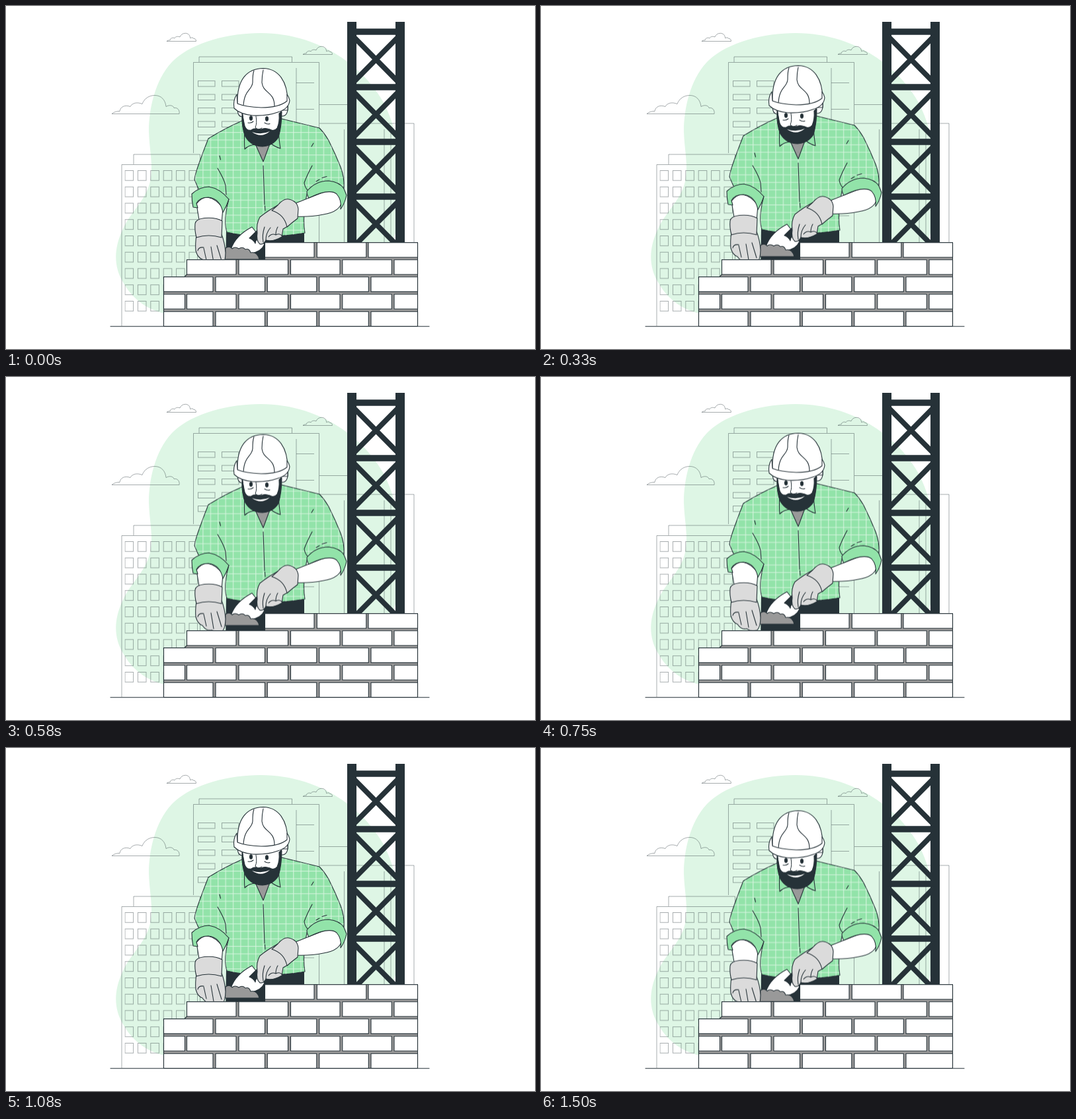
Animation of 800 by 520 pixels, one loop 1.54 s. Source, as an HTML page without scripts:

```html
<!DOCTYPE html>
<html lang="en">
<head>
<meta charset="utf-8">
<title>Bricklayer</title>
<style>
  html, body { margin: 0; width: 100%; height: 100%; overflow: hidden; background: #fff; }
  svg { display: block; width: 100%; height: 100%; }
  .city, .cloud { fill: none; stroke: #263238; stroke-opacity: .4; stroke-width: 1; }
  .cloud { vector-effect: non-scaling-stroke; }
  .tower { fill: none; stroke: #263238; }
  .ink { stroke: #263238; stroke-width: 1.1; stroke-linejoin: round; stroke-linecap: round; }
  .line { fill: none; }
  .white { fill: #fff; }
  .shirt { fill: #92e3a9; }
  .glove { fill: #dbdbdb; }
  .mortar { fill: #999; }
  .dark { fill: #263238; }
  .man { animation: bob 1540ms linear infinite; }
  @keyframes bob {
    0% { transform: translateY(0); }
    48.4% { transform: translateY(-9.5px); }
    97.4% { transform: translateY(.5px); }
    100% { transform: translateY(0); }
  }
</style>
</head>
<body>
<svg viewBox="0 0 800 520">
  <defs>
    <pattern id="panes" x="179.5" y="249" width="19.4" height="24.75" patternUnits="userSpaceOnUse">
      <rect class="city" x=".5" y=".5" width="12.6" height="15"/>
    </pattern>
    <pattern id="plaid" x="349.500" y="163.500" width="11.4" height="11.4" patternUnits="userSpaceOnUse">
      <path d="M5.5 0V11.4M0 5.5H11.4" stroke="#fff" stroke-opacity=".65" fill="none"/>
    </pattern>
    <path id="cloud" class="cloud" d="M0 0H102C103-6 99-10 94-9C93-13 87-14 82-11C81-21 75-28 65-28C56-28 49-23 46-15C39-18 31-17 28-11C20-14 13-11 12-4C8-4 3-3 0 0Z"/>
    <g id="slots">
      <rect x="290.5" width="25.5" height="8.5"/>
      <rect x="326.5" width="25.5" height="8.5"/>
    </g>
    <path id="brace" stroke-width="8" d="M526 3L593 71M593 3L526 71"/>
    <rect id="brick" class="white ink" width="74.5" height="22.3"/>
    <g id="oddRow">
      <use href="#brick" x="238.5"/><use href="#brick" x="317"/><use href="#brick" x="395.3"/><use href="#brick" x="473.8"/>
      <rect class="white ink" x="552" width="70.5" height="22.3"/>
    </g>
    <g id="evenRow">
      <use href="#brick" x="273.5"/><use href="#brick" x="352"/><use href="#brick" x="430.5"/><use href="#brick" x="508.8"/>
      <rect class="white ink" x="587" width="35.5" height="22.3"/>
    </g>
    <path id="torso" d="M357 174Q330 186 306 201Q297 224 290 244Q286 256 285 263Q288 270 291 277L337 293Q334 303 333 312Q330 330 334 343Q360 349 390 349Q425 349 452 344Q449 328 452 300L456 281L511 276Q512 260 506 244Q498 224 488 204Q481 192 474 185L417 171Z"/>
  </defs>

  <path fill="#def6e5" d="M385 41C335 41 278 56 250 86C226 112 216 155 216 190C217 220 223 240 218 266C211 296 188 312 176 340C163 368 163 394 176 417C190 443 212 460 240 466H420L560 400C590 360 599 320 598 275C597 225 589 170 562 132C525 78 460 41 385 41Z"/>

  <g class="city">
    <path d="M175 485V240.5H293.5M193 240V225H293.5V485"/>
    <rect x="179.5" y="249" width="113" height="215" fill="url(#panes)" stroke="none"/>
    <path d="M283.5 223V85.5H473.5V358M292 85V77H432.5V85M439 94V358M439 116.5H466M439 156.5H466M439 318H466"/>
    <use href="#slots" y="113.5"/><use href="#slots" y="134"/><use href="#slots" y="154.5"/><use href="#slots" y="175"/><use href="#slots" y="195.5"/>
    <path d="M474 149.5H517M474 178H617V358M511.5 187V358M572 187V358M582 187V358"/>
  </g>
  <use href="#cloud" transform="translate(160 163.5)"/>
  <use href="#cloud" transform="translate(243 53.5) scale(.435)"/>
  <use href="#cloud" transform="translate(449 73.5) scale(.435)"/>

  <g class="tower">
    <path stroke-width="14" d="M523 24V359M596 24V359"/>
    <path stroke-width="9.6" d="M523 39H596M523 123H596M523 206H596M523 289H596"/>
    <use href="#brace" y="44"/><use href="#brace" y="127.5"/><use href="#brace" y="210.5"/>
    <use href="#brace" y="293.5"/>
  </g>

  <g class="man">
    <path class="dark" d="M333 340H451V410H332Z"/>
    <use href="#torso" class="shirt ink"/>
    <use href="#torso" fill="url(#plaid)"/>
    <g class="ink">
      <path class="line" d="M320 246Q330 263 332 272L333 286M463 242Q455 257 451 268Q452 275 456 279M323 227L324.500 233M465 208L462 213M469 266L474 263M478 260.500L485 258.500M389 242L391 301M391.500 303L392 310"/>

      <!-- neck and collar -->
      <path class="mortar" d="M376 207L400 206L389 236Z"/>
      <path class="shirt" d="M361 188Q360 205 361 217Q368 210 378 210ZM412 187Q413 204 415 216Q407 214 399 207Z"/>

      <!-- arms -->
      <path class="white" d="M288 300Q305 278 328 306L326 330H293Z"/>
      <path class="shirt" d="M281 285Q293 274 307 274Q324 277 337 293Q334 303 328 313Q324 292 306 290Q293 290 288 299L290 306L283 305Q281 296 281 285Z"/>
      <path class="white" d="M438 299Q468 287 486 280Q506 278 508 295Q506 312 480 316Q460 320 438 319Z"/>
      <path class="shirt" d="M455 281Q468 265 488 265Q505 267 511 277L515 287Q512 300 506 308Q508 294 500 285Q489 276 458 291Q455 287 455 281Z"/>

      <!-- trowel and mortar -->
      <path class="white" d="M340 369Q347 348 372 335L379 344Q382 354 391 361Q386 373 370 375Z"/>
      <path class="dark" d="M384 336L368 352Q374 354 377 360Q377 353 386 350Z"/>
      <path class="mortar" d="M331 384L332 367Q338 363 342 368Q346 364 352 368Q358 364 362 369Q368 367 370 374Q380 372 383 384Z"/>

      <!-- gloves -->
      <path class="glove" d="M288 347Q286 361 287 371Q290 382 297 384Q303 393 311 391Q318 396 327 393Q332 388 332 374Q331 359 326 346Z"/>
      <path class="glove" d="M286 330Q287 323 300 321.500Q318 320 327 326L326 351Q306 345 288 351Q285 340 286 330Z"/>
      <path class="line" d="M290 371Q291 365 299 366M299 367L303 385M310 365L314 389M319 363L326 386"/>
      <path class="glove" d="M411 302Q395 311 384 320Q378 330 380 344Q378 356 384 361Q390 362 393 355Q404 358 417 350L419 338L426 334Z"/>
      <path class="glove" d="M411 302Q420 291 428 293Q441 296 442 308L441 322Q433 328 425 335Q421 316 402 310Z"/>
      <path class="line" d="M391 335Q387 347 389 358M400 336Q393 344 393 355M411 335Q408 340 408 347M397 350Q402 344 408 347Q414 344 417 348"/>

      <!-- head -->
      <path class="white" d="M351 150Q348 168 358 168L362 150ZM426 148Q428 168 416 167L414 150Z"/>
      <path class="white" d="M357 155H416L413 194Q390 206 361 194Z"/>
      <path class="dark" d="M357 162Q356 184 362 198Q371 213 388 213Q404 212 412 199Q417 182 417 160L413 163Q414 177 410 185Q405 191 399 187Q391 184 386 187Q376 184 371 188Q364 190 361 182Z"/>
      <path class="white" stroke="none" d="M372 191Q386 196 399 190Q386 201 372 191Z"/>
      <path class="white" d="M378 167Q380 178 377 184Q381 189 387 185" stroke-width="1"/>
      <path class="line" d="M366 177Q371 178 374 175M391 177Q395 180 399 178.500"/>
      <ellipse class="dark" cx="370.500" cy="170" rx="2" ry="3.200"/>
      <ellipse class="dark" cx="394.500" cy="171" rx="2" ry="3.200"/>
      <path class="white" d="M350 158V148C349 112 364 95 389 94.500C412 95 426 114 426 146V158Z"/>
      <path class="line" d="M375 98Q373 103 373 116C372 128 360 127 359 152M389 97Q387 106 387 116C389 133 406 129 406 152"/>
      <path class="white" d="M349 134Q343 143 345 155Q354 164 373 166Q395 167 411 161Q428 156 429 143Q428 138 425 134L425 144Q413 154 386 154Q362 153 350 148Z"/>
    </g>
  </g>

  <path class="mortar ink" d="M391.500 358.500H622.500V485.500H238.500V410.500H270L273.500 407V384.500H391.500Z"/>
  <use href="#brick" x="391.500" y="358.700"/><use href="#brick" x="470.300" y="358.700"/><use href="#brick" x="548" y="358.700"/>
  <use href="#evenRow" y="384.700"/>
  <use href="#oddRow" y="410.800"/>
  <use href="#evenRow" y="437"/>
  <rect class="white ink" x="238.500" y="437" width="32" height="22.300"/>
  <use href="#oddRow" y="463.200"/>
  <path class="ink" d="M158 485.700H640"/>
</svg>
</body>
</html>
```
